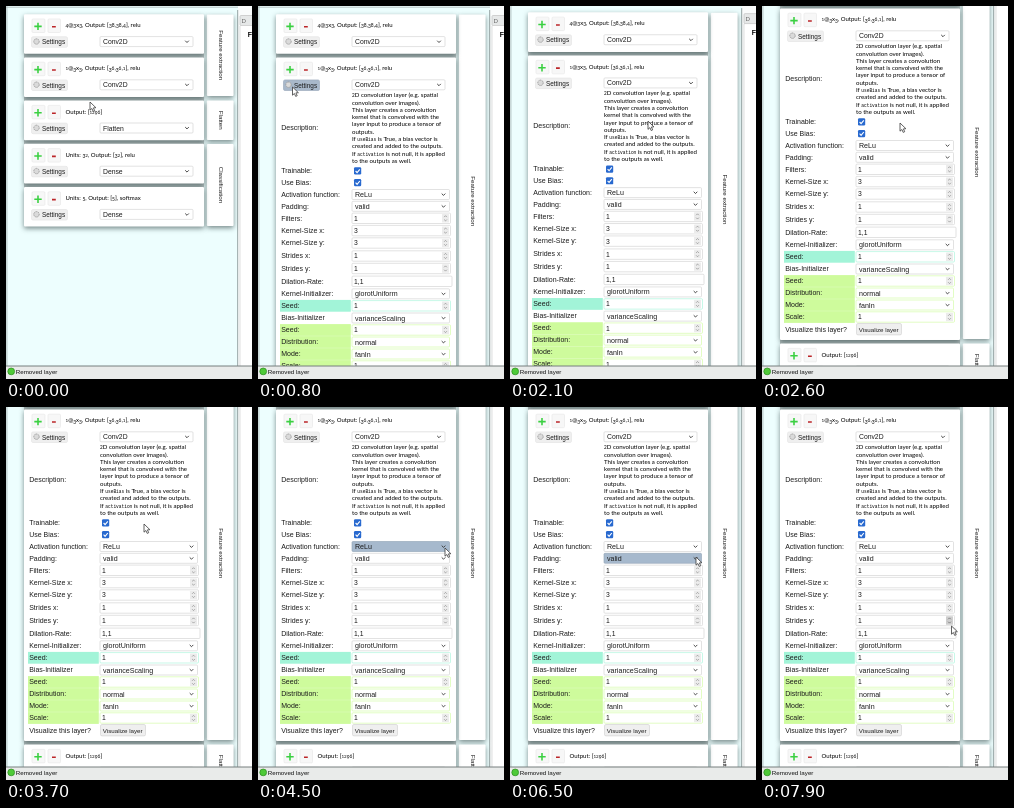
Recreate the animation shown at these times as an HTML page with a canvas. Size 246x373 px, loop 8 s.

```html
<!DOCTYPE html>
<html lang="en">
<head>
<meta charset="utf-8">
<title>Layer settings</title>
<style>
html, body { margin: 0; width: 100%; height: 100%; overflow: hidden; background: #edfefe; }
canvas { display: block; width: 246px; height: 373px; }
</style>
</head>
<body>
<canvas id="stage"></canvas>
<script>
const W = 246, H = 373, LOOP = 8000;
const canvas = document.getElementById('stage');
const ratio = window.devicePixelRatio || 1;
canvas.width = W * ratio;
canvas.height = H * ratio;
const c = canvas.getContext('2d');

const SANS = '"Liberation Sans", Arial, sans-serif';
const HUMAN = 'Lato, sans-serif';
const MONO = '"Liberation Mono", monospace';
const GROWTH = 292;   // extra height of the opened card
const SCROLL = 49;

const layers = [
  ['4@3x3, Output: [38,38,4], relu', 'Conv2D'],
  ['1@3x3, Output: [36,36,1], relu', 'Conv2D'],
  ['Output: [1296]', 'Flatten'],
  ['Units: 32, Output: [32], relu', 'Dense'],
  ['Units: 5, Output: [5], softmax', 'Dense']
];

const about = [
  '2D convolution layer (e.g. spatial', 'convolution over images).',
  'This layer creates a convolution', 'kernel that is convolved with the',
  'layer input to produce a tensor of', 'outputs.',
  'If `useBias` is True, a bias vector is', 'created and added to the outputs.',
  'If `activation` is not null, it is applied', 'to the outputs as well.'
];

// label, kind, value, centre y, label tint
const AQUA = '#a2f4d8', LIME = '#cefb9c';
const fields = [
  ['Trainable:', 'check', '', 165],
  ['Use Bias:', 'check', '', 176.7],
  ['Activation function:', 'select', 'ReLu', 188.5],
  ['Padding:', 'select', 'valid', 200.3],
  ['Filters:', 'number', '1', 212.3],
  ['Kernel-Size x:', 'number', '3', 224.6],
  ['Kernel-Size y:', 'number', '3', 237],
  ['Strides x:', 'number', '1', 250],
  ['Strides y:', 'number', '1', 262.5],
  ['Dilation-Rate:', 'text', '1,1', 275.3],
  ['Kernel-Initializer:', 'select', 'glorotUniform', 287.8],
  ['Seed:', 'number', '1', 299.8, AQUA],
  ['Bias-Initializer', 'select', 'varianceScaling', 312],
  ['Seed:', 'number', '1', 324, LIME],
  ['Distribution:', 'select', 'normal', 336, LIME],
  ['Mode:', 'select', 'fanIn', 348, LIME],
  ['Scale:', 'number', '1', 360, LIME],
  ['Visualize this layer?', 'button', 'Visualize layer', 372.3]
];

// time, x, y of the pointer tip
const path = [
  [0, 84, 96], [100, 84, 96], [400, 34.5, 81], [980, 34.5, 81], [1750, 138, 115],
  [2000, 138, 115], [2600, 138, 117], [3700, 138, 117], [4400, 187, 141],
  [5750, 187, 141], [6400, 186, 150], [7200, 186, 150], [7800, 189.5, 219], [LOOP, 189.5, 219]
];

const smooth = (t, a, b) => {
  const u = Math.min(1, Math.max(0, (t - a) / (b - a)));
  return u * u * (3 - 2 * u);
};

function pointerAt(t) {
  let i = 1;
  while (i < path.length - 1 && path[i][0] < t) i++;
  const [t0, x0, y0] = path[i - 1], [t1, x1, y1] = path[i];
  const k = smooth(t, t0, t1);
  return { x: x0 + (x1 - x0) * k, y: y0 + (y1 - y0) * k };
}

function text(s, x, y, size, color = '#1c1c1c', family = SANS, align = 'left') {
  c.font = size + 'px ' + family;
  c.fillStyle = color;
  c.textAlign = align;
  c.fillText(s, x, y);
  return c.measureText(s).width;
}

// Humanist text with low, old-style digits and `code` parts
function prose(s, x, y, size) {
  const put = (part, scale, drop = 0, family = HUMAN) => {
    x += text(part, x, y + drop, size * scale, '#000', family);
  };
  for (const part of s.match(/`\w+`|\d|[^`\d]+/g)) {
    if (part[0] === '`') put(part.slice(1, -1), .74, 0, MONO);
    else if (/[012]/.test(part)) put(part, .76);
    else if (/[68]/.test(part)) put(part, .82);
    else if (/\d/.test(part)) put(part, .82, 1.1);
    else put(part, 1);
  }
}

function box(x, y, w, h, fill, stroke, r = 1) {
  c.beginPath();
  c.roundRect(x, y, w, h, r);
  c.fillStyle = fill;
  c.fill();
  if (stroke) {
    c.strokeStyle = stroke;
    c.lineWidth = .6;
    c.stroke();
  }
}

function line(color, width, ...p) {
  c.beginPath();
  for (let i = 0; i < p.length; i += 2) c.lineTo(p[i], p[i + 1]);
  c.strokeStyle = color;
  c.lineWidth = width;
  c.stroke();
}

function disc(x, y, r, fill, stroke, width) {
  c.beginPath();
  c.arc(x, y, r, 0, 7);
  c.fillStyle = fill;
  c.fill();
  c.strokeStyle = stroke;
  c.lineWidth = width;
  c.stroke();
}

function panel(x, y, w, h) {
  c.save();
  c.shadowColor = 'rgba(40,60,60,.6)';
  c.shadowBlur = 5 * ratio;
  c.shadowOffsetY = 2 * ratio;
  box(x, y, w, h, '#fff', null, 1);
  c.restore();
}

const within = (p, x, y, w, h) => p.x >= x && p.x <= x + w && p.y >= y && p.y <= y + h;

function select(value, x, y, w, size, hot, edge = '#cfcfcf') {
  box(x, y - 5, w, 10, hot ? '#a6b9cd' : '#fff', hot ? '#8f a1b4'.replace(' ', '') : edge);
  text(value, x + 3, y + 2.5, size);
  const ax = x + w - 6;
  line('#333', .9, ax - 1.8, y - .9, ax, y + .9, ax + 1.8, y - .9);
}

function spinner(x, y, hot) {
  box(x, y - 4.2, 7, 8.4, hot ? '#cecece' : '#ececec', null, .5);
  const color = hot ? '#666' : '#8a8a8a';
  line(color, .7, x + 2.1, y - 1.2, x + 3.5, y - 2.6, x + 4.9, y - 1.2);
  line(color, .7, x + 2.1, y + 1.2, x + 3.5, y + 2.6, x + 4.9, y + 1.2);
}

function head(layer, top, p) {
  const [title, type] = layer;
  box(26, top + 4.8, 13, 13.5, '#f7f7f7', '#e6e6e6');
  box(42, top + 4.8, 12.5, 13.5, '#f7f7f7', '#e6e6e6');
  line('#3bd042', 1.6, 28.3, top + 12.2, 35.7, top + 12.2);
  line('#3bd042', 1.6, 32, top + 8.5, 32, top + 15.9);
  line('#bb2528', 1.6, 46, top + 12.6, 49.8, top + 12.6);
  prose(title, 59.5, top + 13, 6);

  const hot = within(p, 25.5, top + 22, 36.5, 11);
  box(25.5, top + 22.5, 36, 10.6, hot ? '#a8b8ca' : '#efefef', hot ? '#95a5b8' : '#e2e2e2', 1.5);
  c.setLineDash([1.3, .7]);
  disc(30.5, top + 27.3, 2.7, '#dadada', '#9c9c9c', 1);
  c.setLineDash([]);
  text('Settings', 36, top + 30.1, 6.4);
  select(type, 94, top + 27.4, 93, 6.8, within(p, 94, top + 22, 93, 10));
}

function field([label, kind, value, y, tint], p) {
  if (tint) {
    c.fillStyle = tint;
    c.fillRect(22, y - 5.9, 70.8, 11.8);
  }
  text(label, 23.2, y + 2.3, 7);
  if (kind === 'check') {
    box(96, y - 3.7, 7.2, 7.2, '#2869cf', null, 1.2);
    line('#fff', 1.1, 97.6, y, 99.1, y + 1.6, 101.8, y - 1.7);
  } else if (kind === 'select') {
    select(value, 94, y, 97.5, 7.1, within(p, 94, y - 5, 97.5, 10), tint);
  } else if (kind === 'button') {
    box(94.5, y - 5.8, 45, 11.4, '#efefef', '#cecece', 1.5);
    text(value, 96.8, y + 2.2, 6.2);
  } else {
    box(94, y - 5.2, kind === 'text' ? 100 : 98.5, 10.4, '#fff', tint || '#cfcfcf');
    text(value, 96, y + 2.4, 6.8);
    if (kind === 'number') spinner(184, y, within(p, 94, y - 6, 99, 12.5));
  }
}

function tab(label, top, bottom) {
  panel(200.8, top, 26.8, bottom - top);
  c.save();
  c.translate(214.8, (top + bottom) / 2);
  c.rotate(Math.PI / 2);
  text(label, 0, 2.2, 6.2, '#1c1c1c', SANS, 'center');
  c.restore();
}

function sidePanel() {
  c.fillStyle = '#fafcfc';
  c.fillRect(232, 0, 20, 500);
  box(234, 9.5, 20, 10, '#e6e8e8', '#bbb');
  text('D', 235.5, 16.5, 6.2, '#666');
  box(234, 19.5, 20, 500, '#fff', '#c9c9c9');
  c.save();
  c.translate(241.5, 30.5);
  text('F', 0, 0, 6.8, '#111');
  text('F', .4, 0, 6.8, '#111');
  c.restore();
  line('#8d9999', .9, 231.7, 4, 231.7, 520);
}

function statusBar() {
  c.fillStyle = '#e9ebea';
  c.fillRect(0, 360, W, 13);
  line('#777f7f', 1, 0, 360, W, 360);
  disc(5.2, 365.4, 3.4, '#4fca38', '#2b8a20', .7);
  text('Removed layer', 9.8, 367.5, 6.2, '#111');
}

function pointer({ x, y }) {
  const shape = [0, 0, 0, 8.2, 1.9, 6.5, 3.2, 9.4, 4.7, 8.7, 3.4, 5.9, 5.9, 5.7];
  c.beginPath();
  for (let i = 0; i < shape.length; i += 2) c.lineTo(x + shape[i], y + shape[i + 1]);
  c.closePath();
  c.fillStyle = '#fff';
  c.fill();
  c.strokeStyle = '#3a3a3a';
  c.lineWidth = .8;
  c.stroke();
}

function draw(t) {
  const extra = GROWTH * smooth(t, 400, 790);
  const scroll = SCROLL * smooth(t, 2040, 2560);
  const tip = pointerAt(t);
  const p = { x: tip.x, y: tip.y + scroll };

  c.setTransform(ratio, 0, 0, ratio, 0, 0);
  c.fillStyle = '#edfefe';
  c.fillRect(0, 0, W, H);
  line('#a3b0b0', .8, .9, 0, .9, 361);

  c.save();
  c.translate(0, -scroll);
  line('#aab6b6', .8, 0, 1.2, W, 1.2);
  sidePanel();

  tab('Feature extraction', 8.5, 90 + extra);
  tab('Flatten', 94.5 + extra, 134 + extra);
  tab('Classification', 138 + extra, 220 + extra);

  c.fillStyle = '#b4c0c0';
  c.fillRect(18, 9, 180, 211 + extra);
  layers.forEach((layer, i) => {
    const top = 8.2 + 43.2 * i + (i > 1 ? extra : 0);
    const height = 39.6 + (i === 1 ? extra : 0);
    panel(18, top, 180, height);
    c.save();
    c.beginPath();
    c.rect(18, top, 180, height);
    c.clip();
    head(layer, top, p);
    if (i === 1 && extra > 0) {
      text('Description:', 23.2, 124.3, 7);
      about.forEach((s, n) => prose(s, 94, 91.2 + n * 7.3, 6.1));
      fields.forEach(f => field(f, p));
    }
    c.restore();
  });
  c.restore();

  statusBar();
  pointer(tip);
}

const start = performance.now();
function tick() {
  draw((performance.now() - start) % LOOP);
  requestAnimationFrame(tick);
}
tick();
</script>
</body>
</html>
```
